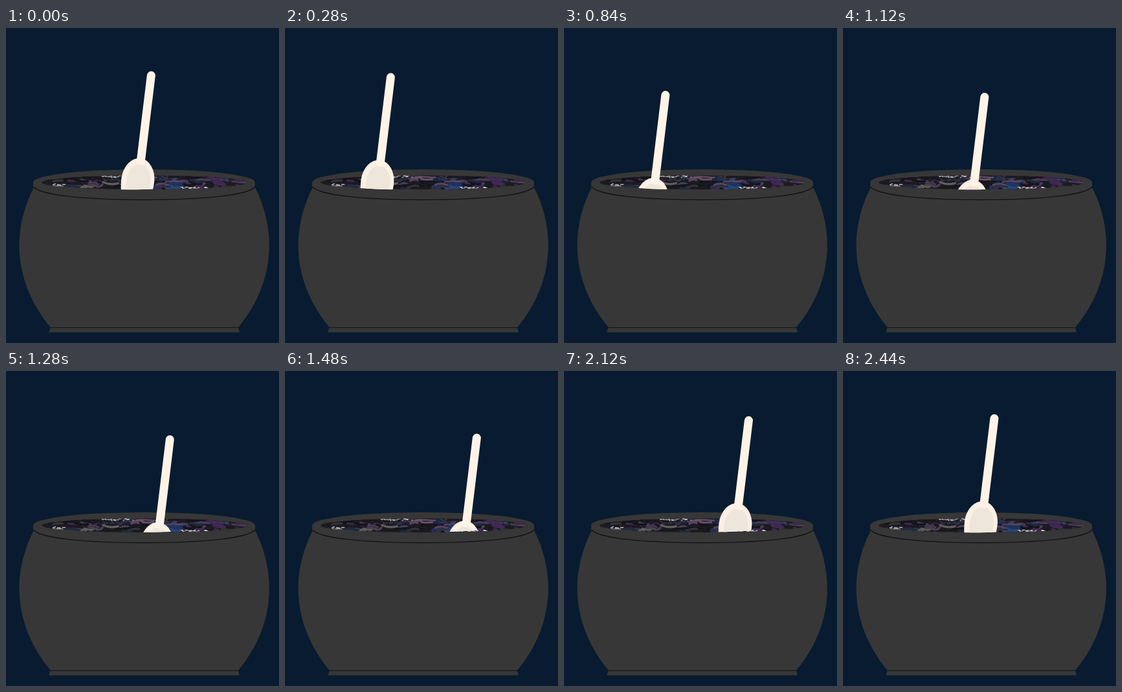
These frames come from a looping animation (422x486 px, 2480 ms). An HTML page:

```html
<!DOCTYPE html>
<html lang="en">
<head>
<meta charset="utf-8">
<title>Stirring pot</title>
<style>
  html, body { margin: 0; width: 100%; height: 100%; overflow: hidden; background: #081b30; }
  svg { display: block; width: 422px; height: 486px; }
</style>
</head>
<body>
<svg viewBox="0 0 422 486">
  <defs>
    <clipPath id="opening"><ellipse cx="214" cy="238.3" rx="159" ry="10.8"/></clipPath>
    <clipPath id="surface"><path d="M55 0V237C80 246 130 249.300 190 249.300S320 245 373 241V0Z"/></clipPath>
  </defs>
  <rect width="422" height="486" fill="#081b30"/>

  <g fill="#373737">
    <path d="M44 244C30 270 20.500 303 20.500 335C20.500 386 42 430 69 462L66 469.500H361L359 462C386 430 407 386 407 335C407 303 398 270 384 244Z"/>
    <path d="M42 238A171.500 20 0 0 1 385 238V246C374 258 305 265 213.500 265S53 258 42 246Z"/>
  </g>
  <g fill="none" stroke="#121212" stroke-width="1.3">
    <path d="M42.500 245C53 258 122 265 213.500 265S374 258 385 245"/>
    <path d="M68 462.300H360" stroke-width="1"/>
  </g>

  <g clip-path="url(#opening)">
    <rect x="50" y="224" width="330" height="28" fill="#1b1a20"/>
    <g id="brew" fill="none" stroke-linecap="round"></g>
  </g>

  <g clip-path="url(#surface)">
    <g id="spoon">
      <path d="M-25.500 0A25.500 34 0 0 1 25.500 0A25.500 52 0 0 1 -25.500 0Z" fill="#fcefe4" transform="translate(-20 168) rotate(7)"/>
      <path d="M-18.500 0A18.500 27 0 0 1 18.500 0A18.500 45 0 0 1 -18.500 0Z" fill="#eee6db" transform="translate(-19 169.500) rotate(7)"/>
      <path d="M.600 6.500L-15.400 138" stroke="#fff3e7" stroke-width="13" stroke-linecap="round"/>
    </g>
  </g>
</svg>
<script>
const LOOP = 2480;
// time, x, y of the handle tip
const keys = [
  [0, 224, 66.8], [280, 163, 69.5], [560, 104, 79.3], [600, 102, 85],
  [840, 156, 97], [1120, 218, 100], [1480, 295.5, 96.8], [1680, 339.5, 92],
  [1760, 354, 85], [1800, 353.2, 80], [1960, 321, 73], [2120, 285, 69.8],
  [2240, 271, 68.5], [2440, 233.5, 66.8]
];
const count = keys.length;

function key(i) {
  const [t, x, y] = keys[(i + count) % count];
  return [t + LOOP * Math.floor(i / count), x, y];
}

// Cubic through the keys, with slopes taken from the neighbours
function tip(time) {
  let i = count - 1;
  while (keys[i][0] > time) i--;
  const [a, b, c, d] = [i - 1, i, i + 1, i + 2].map(key);
  const span = c[0] - b[0], u = (time - b[0]) / span, v = 1 - u;
  return [1, 2].map(k => {
    const m = (c[k] - a[k]) / (c[0] - a[0]) * span;
    const n = (d[k] - b[k]) / (d[0] - b[0]) * span;
    return (1 + 2 * u) * v * v * b[k] + u * v * v * m
      + u * u * (3 - 2 * u) * c[k] - u * u * v * n;
  });
}

let seed = 17;
function rand(min, max) {
  seed = (seed * 16807) % 2147483647;
  return min + (max - min) * seed / 2147483647;
}

const brew = document.getElementById('brew');
function add(d, stroke, width) {
  const path = document.createElementNS('http://www.w3.org/2000/svg', 'path');
  path.setAttribute('d', d);
  path.setAttribute('stroke', stroke);
  path.setAttribute('stroke-width', width);
  brew.append(path);
}

function swirls(n, from, to, colors) {
  for (let i = 0; i < n; i++) {
    const x = rand(from, to), y = rand(228, 248), w = rand(8, 26);
    const color = colors[Math.floor(rand(0, colors.length))];
    add(`M${x} ${y}q${w / 2} ${rand(-6, 6)} ${w} ${rand(-3, 3)}`, color, rand(2, 4));
  }
}

function flecks(n, x, y, w, h) {
  for (let i = 0; i < n; i++) {
    add(`M${x + rand(0, w)} ${y + rand(0, h)}h${rand(1, 3)}`, '#d8d2da', 1);
  }
}

swirls(100, 50, 365, ['#3d2a4c', '#4c3d5c', '#1b1a21', '#131318', '#333238', '#1d2a40']);
swirls(10, 115, 165, ['#5f5e61', '#454548', '#18181b']);
swirls(7, 228, 256, ['#2a4577', '#1f3360']);
swirls(9, 190, 262, ['#675068', '#58435f', '#1a1920']);
swirls(12, 270, 325, ['#412857', '#3a2a4a', '#15131a']);
flecks(30, 143, 227, 58, 4);
flecks(18, 72, 240, 20, 4);
flecks(22, 270, 245, 40, 3);

const spoon = document.getElementById('spoon');
function draw() {
  const [x, y] = tip(performance.now() % LOOP);
  spoon.setAttribute('transform', `translate(${x.toFixed(2)} ${y.toFixed(2)})`);
  requestAnimationFrame(draw);
}
draw();
</script>
</body>
</html>
```
